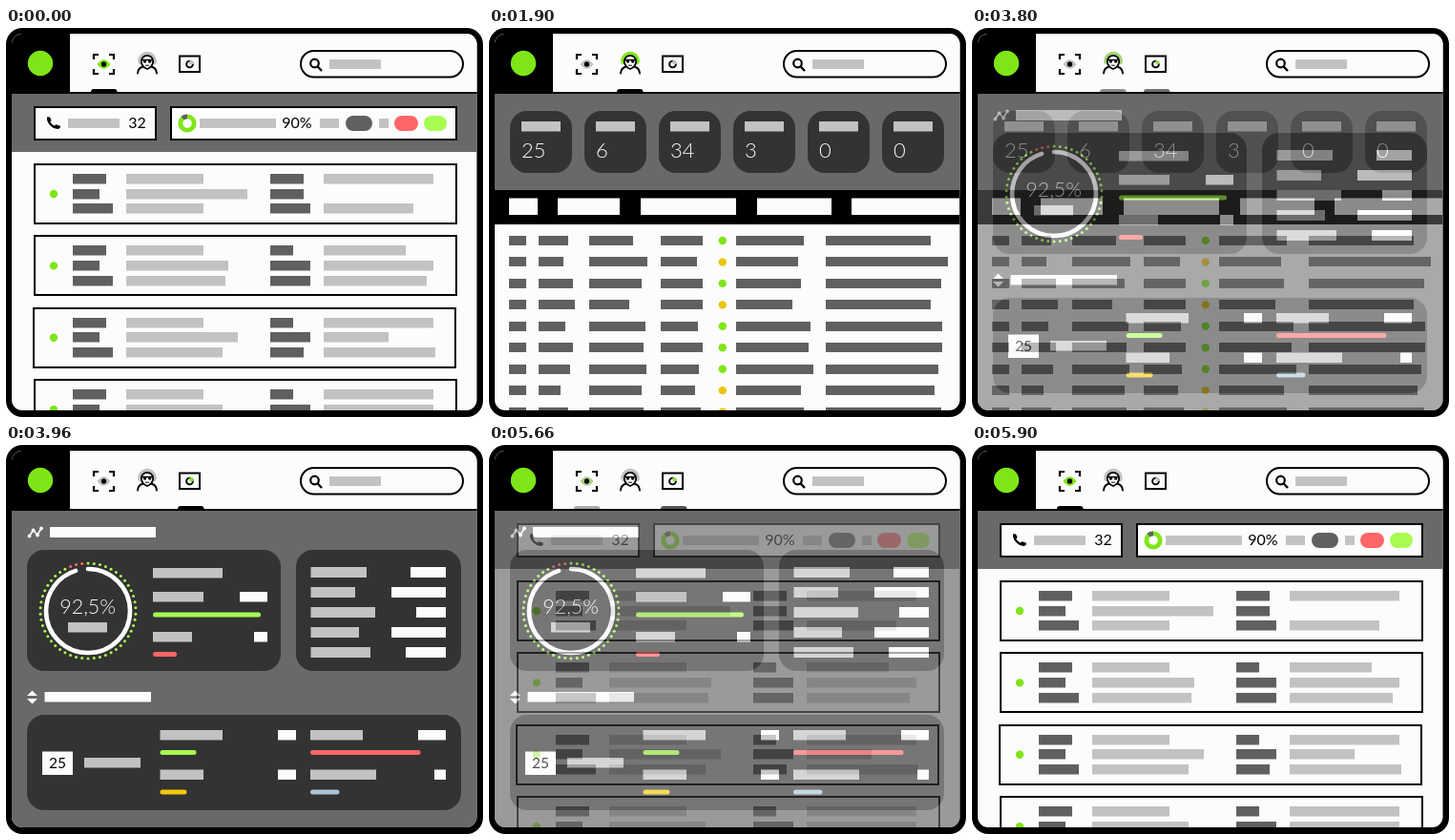
An HTML page with a canvas that plays this animation: 500x408 px, repeating every 6020 ms.

```html
<!DOCTYPE html>
<html lang="en">
<head>
<meta charset="utf-8">
<title>Dashboard views</title>
<style>
html, body { margin: 0; width: 100%; height: 100%; overflow: hidden; background: #fff; }
canvas { display: block; width: 500px; height: 408px; }
</style>
</head>
<body>
<canvas id="stage" width="500" height="408"></canvas>
<script>
const W = 500, H = 408, LOOP = 6020, STEP = 20;
const WHITE = '#fcfcfc', BLACK = '#000', BAND = '#696969', LIGHT = '#c2c2c2', DARK = '#606060',
      PANEL = '#333', GREEN = '#7ee617', LIME = '#a8fc50', RED = '#ff6667', YELLOW = '#eac50c', BLUE = '#a9c5d5';
const FONT = 'Lato, "Open Sans", sans-serif';
const TAU = Math.PI * 2;
let g;

// Rectangle given by its edges
function bar(x1, y1, x2, y2, color) {
  g.fillStyle = color;
  g.fillRect(x1, y1, x2 - x1, y2 - y1);
}
function round(x1, y1, x2, y2, r, color) {
  g.fillStyle = color;
  g.beginPath();
  g.roundRect(x1, y1, x2 - x1, y2 - y1, r);
  g.fill();
}
function frame(x1, y1, x2, y2) {
  bar(x1 - 1, y1 - 1, x2 + 1, y2 + 1, BLACK);
  bar(x1 + 1, y1 + 1, x2 - 1, y2 - 1, WHITE);
}
function dot(x, y, r, color) {
  g.fillStyle = color;
  g.beginPath();
  g.arc(x, y, r, 0, TAU);
  g.fill();
}
function arc(x, y, r, from, to, width, color) {
  g.strokeStyle = color;
  g.lineWidth = width;
  g.beginPath();
  g.arc(x, y, r, from * TAU / 360, to * TAU / 360);
  g.stroke();
}
function path(d, stroke, width, fill) {
  const p = new Path2D(d);
  if (fill) { g.fillStyle = fill; g.fill(p); }
  if (stroke) { g.strokeStyle = stroke; g.lineWidth = width; g.stroke(p); }
}
function text(s, x, y, size, color, weight = 400) {
  g.font = `${weight} ${size}px ${FONT}`;
  g.fillStyle = color;
  g.fillText(s, x, y);
}
function meter(x1, x2, y, color) {
  round(x1, y - 2.5, x2, y + 2.5, 2.5, color);
}

function eyeIcon(on) {
  path('M92 33V28H97 M108 28H113V33 M113 43V48H108 M97 48H92V43', BLACK, 2.2);
  path('M95.5 38Q102.5 28.5 109.5 38Q102.5 47.5 95.5 38Z', null, 0, on ? GREEN : LIGHT);
  dot(102.5, 38, 2.7, BLACK);
}

function agentIcon(on) {
  g.lineCap = 'round';
  path('M138 47.5Q138.5 41.5 144 40.5 M152 40.5Q157.5 41.5 158 47.5', BLACK, 2);
  arc(148, 34.5, 8, 168, 372, 3.6, on ? GREEN : LIGHT);
  path('M141.8 35A6.2 6.2 0 0 1 154.2 35Q154 40.5 148 43Q142 40.5 141.8 35Z', BLACK, 1.8, WHITE);
  path('M143 33.5H153', BLACK, 1.3);
  dot(145.5, 35, 1.7, BLACK);
  dot(150.7, 35, 1.7, BLACK);
  path('M146.5 39.2H149.5', BLACK, 1);
  g.lineCap = 'butt';
}

function reportIcon(on) {
  g.strokeStyle = BLACK;
  g.lineWidth = 2;
  g.strokeRect(182, 29.5, 21, 16.5);
  arc(192.5, 38, 3.4, 0, 360, 1.9, BLACK);
  path('M192.5 38V33.6A4.4 4.4 0 0 1 196.9 38Z', null, 0, on ? GREEN : LIGHT);
}

function header(tab) {
  bar(6, 6, 494, 67, WHITE);
  bar(0, 0, 67, 69, BLACK);
  bar(6, 67, 494, 69, BLACK);
  dot(36, 37, 13.2, GREEN);
  eyeIcon(tab === 0);
  agentIcon(tab === 1);
  reportIcon(tab === 2);
  const x = [89, 134, 180][tab];
  round(x, 64, x + 27.5, 68, [3, 3, 0, 0], BLACK);
  g.strokeStyle = BLACK;
  g.lineWidth = 2;
  g.beginPath();
  g.roundRect(309, 24, 170, 27.5, 13.75);
  g.stroke();
  arc(323.5, 37, 4.3, 0, 360, 2.2, BLACK);
  path('M326.5 40.2L331 45', BLACK, 2.4);
  bar(339, 33, 393, 43, LIGHT);
}

function listView() {
  bar(6, 69, 494, 130, BAND);
  frame(30, 83, 157, 117);
  path('M43.2 93.2L46 93.4L47.6 97L46.2 98.6Q47.8 101.3 50.8 102.6L52.3 101.2L56.6 102.6Q57.8 105.6 54.2 105.9C48 105.7 41.6 98.5 43.2 93.2Z', null, 0, BLACK);
  bar(65, 95, 119, 105, LIGHT);
  text('32', 128.3, 105, 16, BLACK);

  frame(173, 83, 472, 117);
  arc(190, 100, 7.2, 0, 360, 4.8, GREEN);
  arc(190, 100, 7.2, 228, 270, 4.8, DARK);
  bar(203, 95, 283, 105, LIGHT);
  text('90%', 289.3, 105, 16, BLACK);
  bar(329, 95, 349, 105, LIGHT);
  round(356, 92, 384, 108, 8, DARK);
  bar(391, 95, 401, 105, LIGHT);
  round(407, 92, 432, 108, 8, RED);
  round(438, 92, 462, 108, 8, LIME);

  // Right edges per card: light left, dark right, light right
  const cards = [
    [[207, 253, 207], [312, 312, 319], [448, 0, 427]],
    [[207, 233, 230], [301, 319, 319], [419, 448, 441]],
    [[207, 243, 227], [301, 319, 312], [448, 401, 450]],
    [[207, 227, 207], [301, 319, 312], [448, 448, 448]]
  ];
  cards.forEach(([a, b, c], i) => {
    const y = 143 + i * 75.4, dx = i === 2 ? -1 : 0;
    const top = Math.round(y);
    frame(30 + dx, top, 472 + dx, top + 62);
    dot(50, y + 31, 4.2, GREEN);
    for (let k = 0; k < 3; k++) {
      const y1 = Math.round(y + 9.8 + k * 15.8), y2 = y1 + 10.5;
      bar(70, y1, [105, 98, 112][k], y2, DARK);
      bar(126, y1, a[k], y2, LIGHT);
      bar(277, y1, b[k], y2, DARK);
      if (c[k]) bar(333, y1, c[k], y2, LIGHT);
    }
  });
}

function tableView() {
  bar(6, 69, 494, 170, BAND);
  ['25', '6', '34', '3', '0', '0'].forEach((n, i) => {
    const x = 22 + i * 78;
    round(x, 87, x + 65, 152, 18, PANEL);
    bar(x + 12, 98, x + 53, 108.5, LIGHT);
    text(n, x + 12, 135.5, 22, WHITE, 300);
  });
  bar(6, 170, 494, 206, BLACK);
  [[21, 51], [72, 137], [159, 259], [281, 359], [380, 493]]
    .forEach(([a, b]) => bar(a, 178.5, b, 196, WHITE));

  const starts = [52, 105, 180, 259, 353];
  const ends = [
    [83, 151, 224, 330, 463], [78, 166, 218, 324, 481], [88, 160, 224, 327, 474],
    [90, 147, 224, 318, 463], [80, 164, 219, 337, 475], [88, 162, 224, 335, 475],
    [85, 165, 220, 340, 471], [75, 160, 216, 327, 467], [83, 162, 222, 330, 474]
  ];
  ends.forEach((row, i) => {
    const y = 223 + i * 22.45, y1 = Math.round(y - 5);
    bar(21, y1, 39, y1 + 10, DARK);
    row.forEach((x, k) => bar(starts[k], y1, x, y1 + 10, DARK));
    dot(244.8, y, 4.2, 'GYGYGGGYY'[i] === 'G' ? GREEN : YELLOW);
  });
}

function gauge(x, y) {
  const n = 50;
  for (let i = 0; i < n; i++) {
    const a = -TAU / 4 + i * TAU / n;
    dot(x + 50 * Math.cos(a), y + 50 * Math.sin(a), 1.5, i > n - 4 ? RED : LIME);
  }
  g.lineCap = 'round';
  arc(x, y, 44, -90, 253, 4.6, WHITE);
  g.lineCap = 'butt';
  text('92,5%', x - 29.8, y + 3, 21.5, WHITE, 300);
  bar(65, 186, 106, 196.5, LIGHT);
}

function reportView() {
  bar(6, 69, 494, 402, BAND);
  path('M24.5 95.5L28.5 89.5L33 94L37 87.5', WHITE, 1.6);
  [[24.5, 95.5], [28.5, 89.5], [33, 94.5], [37, 87.5]].forEach(([x, y]) => dot(x, y, 1.9, WHITE));
  bar(46, 86, 157, 97, WHITE);

  round(22, 110, 288, 237, 18, PANEL);
  gauge(86, 174);
  bar(154, 129, 227, 139.5, LIGHT);
  bar(154, 154, 207, 164.5, LIGHT);
  bar(245, 154, 274, 164.5, WHITE);
  meter(154, 267, 178, LIME);
  bar(154, 196, 195, 206.5, LIGHT);
  bar(260, 196, 274, 206.5, WHITE);
  meter(154, 179, 219.5, RED);

  round(304, 110, 477, 237, 18, PANEL);
  [[378, 424], [366, 404], [387, 430], [370, 404], [382, 419]].forEach(([a, b], i) => {
    const y = 128 + i * 21;
    bar(319.5, y, a, y + 11, LIGHT);
    bar(b, y, 461, y + 11, WHITE);
  });

  path('M27.5 257.5L33 263H22Z M27.5 271.5L33 266H22Z', null, 0, WHITE);
  bar(40.5, 259, 152, 269.5, WHITE);

  round(22, 283, 477, 383, 18, PANEL);
  bar(38, 321.5, 70, 346, WHITE);
  text('25', 45, 339, 15.5, BLACK);
  bar(82, 328, 141, 338.5, LIGHT);
  // Label end, value start, value end, meter end
  const block = (x, y, label, from, to, end, color) => {
    bar(x, y, label, y + 10.5, LIGHT);
    bar(from, y, to, y + 10.5, WHITE);
    meter(x, end, y + 23.5, color);
  };
  block(161.5, 299, 227, 285, 304, 199.5, LIME);
  block(161.5, 340.5, 207, 285, 304, 189.5, '#f0c808');
  block(319, 299, 374, 432, 461, 434.5, RED);
  block(319, 340.5, 388, 449, 461, 349.5, BLUE);
}

function render(tab, view) {
  const c = document.createElement('canvas');
  c.width = W;
  c.height = H;
  g = c.getContext('2d');
  bar(0, 0, W, H, '#fff');
  round(0, 0, W, H, 17, BLACK);
  g.save();
  g.beginPath();
  g.roundRect(6, 6, 487.5, 395, 11);
  g.clip();
  bar(6, 6, 494, 402, WHITE);
  view();
  header(tab);
  g.restore();
  return c;
}

const scenes = [listView, tableView, reportView].map((v, i) => render(i, v));
const fades = [
  { at: 1500, steps: 21 },
  { at: 3620, steps: 18 },
  { at: 5560, steps: 18 }
];
const out = document.getElementById('stage').getContext('2d');

function draw(ms) {
  const t = ms % LOOP;
  let base = 0, next = 0, mix = 0;
  fades.forEach((f, i) => {
    if (t < f.at) return;
    base = i;
    next = (i + 1) % 3;
    mix = Math.min(1, (Math.floor((t - f.at) / STEP) + 1) / f.steps);
  });
  out.globalAlpha = 1;
  out.drawImage(scenes[base], 0, 0);
  out.globalAlpha = mix;
  out.drawImage(scenes[next], 0, 0);
}

let start;
function tick(now) {
  if (start === undefined) start = now;
  draw(Math.max(0, now - start));
  requestAnimationFrame(tick);
}
draw(0);
requestAnimationFrame(tick);
</script>
</body>
</html>
```
